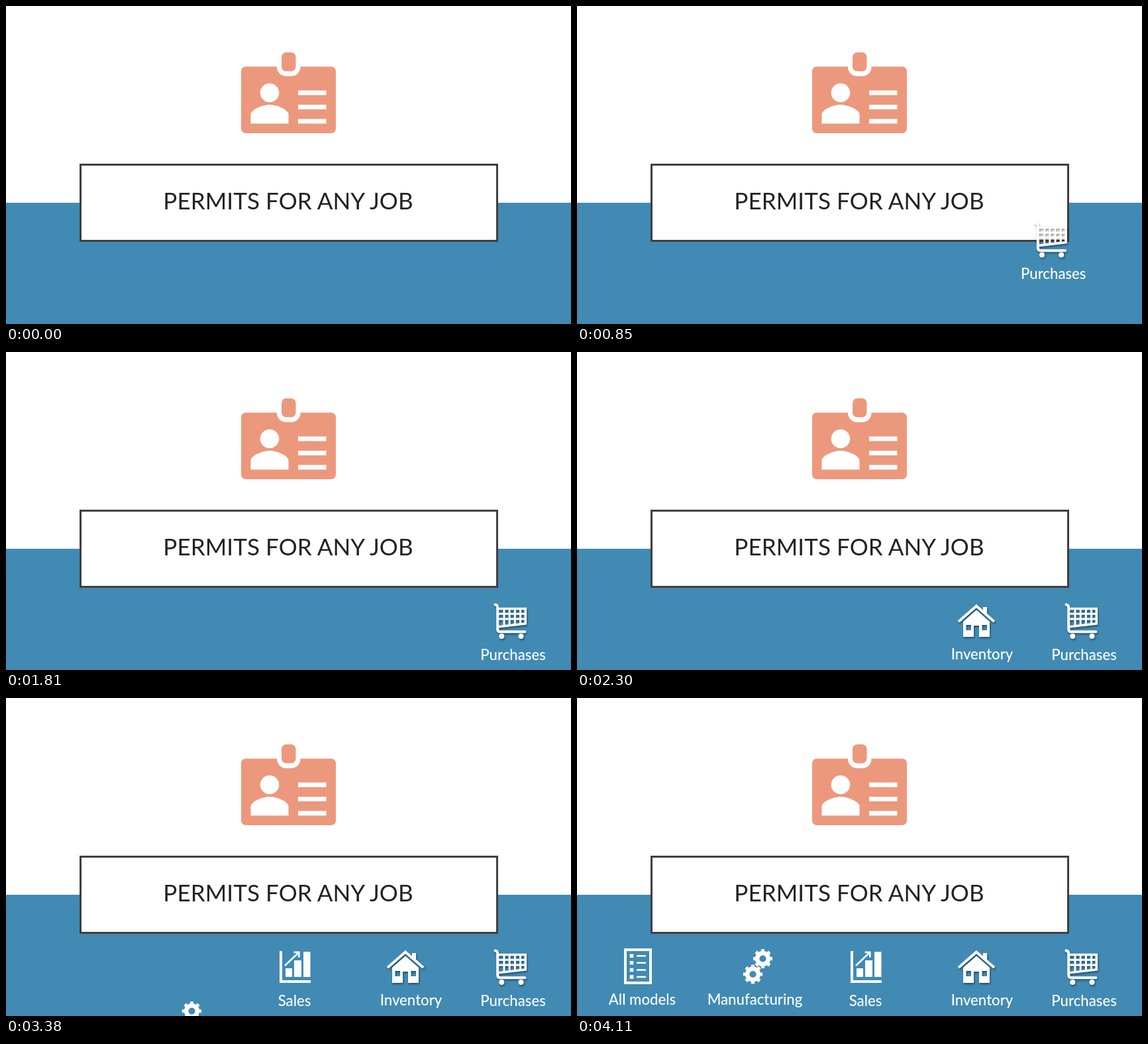
Recreate the animation shown at these times as an HTML page. Size 853 by 480 pixels, loop 4.17 s.

```html
<!DOCTYPE html>
<html lang="en">
<head>
<meta charset="utf-8">
<title>Permits</title>
<style>
html, body { margin: 0; width: 100%; height: 100%; overflow: hidden; background: #fff; }
svg { display: block; width: 853px; height: 480px; }
text { font-family: Lato, "Open Sans", sans-serif; text-anchor: middle; }
.item { fill: #fff; font-size: 22.2px; font-weight: 500; }
.line { fill: none; stroke: #fff; }
.shadow { filter: drop-shadow(1px 2px 1.5px rgba(0, 0, 0, .45)); }
</style>
</head>
<body>
<svg viewBox="0 0 853 480">
  <defs>
    <clipPath id="wipe"><rect id="wipeBox" x="690" y="370" width="163" height="120"/></clipPath>
    <g id="gear" class="line">
      <circle r="8.4" stroke-width="6.6"/>
      <circle r="12.5" stroke-width="4.2" pathLength="16" stroke-dasharray="1 1" stroke-dashoffset=".5"/>
    </g>
  </defs>

  <rect y="297" width="853" height="183" fill="#418ab3"/>

  <g fill="#ec987d">
    <rect x="355" y="91.5" width="143" height="100.5" rx="7"/>
    <rect x="409" y="76" width="35.5" height="30" rx="14" fill="#fff"/>
    <rect x="416" y="70" width="21.5" height="28.5" rx="7"/>
    <g fill="#fff">
      <circle cx="398" cy="131" r="14.3"/>
      <path d="M369.5 177.500V163.500C370 156 388 149 398 149S426 156 426.500 163.500V177.500Z"/>
      <path d="M441 127.500h42.500v7h-42.500zM441 149h42.500v7h-42.500zM441 170.500h42.500v7h-42.500z"/>
    </g>
  </g>

  <rect x="112.500" y="239.500" width="629" height="115" fill="#fff" stroke="#3f3f3f" stroke-width="3"/>
  <text x="426" y="307" font-size="35" letter-spacing=".1" fill="#222">PERMITS FOR ANY JOB</text>

  <g id="models" class="item">
    <rect class="line" x="73" y="380" width="38" height="50" stroke-width="4"/>
    <path class="line" stroke-width="5.5" stroke-dasharray="5.5 5.1" d="M82.500 386.500V424"/>
    <path class="line" stroke-width="2.500" d="M90 389.200h14M90 399.800h14M90 410.400h14M90 421h14"/>
    <text x="98.500" y="463">All models</text>
  </g>

  <g id="making" class="item">
    <use href="#gear" x="280.500" y="393.500"/>
    <use href="#gear" x="265.500" y="417"/>
    <text x="268.500" y="463">Manufacturing</text>
  </g>

  <g id="sales" class="item">
    <path d="M413 382h4v44h43v4h-47zM422 408h10v13h-10zM435 396h11v25h-11zM449 383h10.500v38h-10.500z"/>
    <path class="line" stroke-width="2.500" d="M421 404L441.500 384.500M434.500 383.700h7.800v7.800"/>
    <text x="435.500" y="465">Sales</text>
  </g>

  <g id="stock" class="item">
    <g class="shadow">
      <path class="line" stroke-width="4" d="M576 407L603 383.500 630 407"/>
      <path d="M613 385h6v12l-6 -5z"/>
      <path fill-rule="evenodd" d="M583 407L603 389.500 623 407V430H583ZM587.500 412v8h7.500v-8zM611.500 412v8h7.500v-8zM599 413v17h8v-17z"/>
    </g>
    <text x="611.500" y="464">Inventory</text>
  </g>

  <g id="buying" class="item"><g clip-path="url(#wipe)">
    <g class="shadow">
      <path class="line" stroke-width="4" stroke-linecap="round" d="M738.500 381.200q3.700 .6 3.700 4.600V418.500q0 3.800 3.800 3.800H783.500"/>
      <path class="line" stroke-width="3.600" d="M743 387.500H784.300V410L743 414.800"/>
      <path class="line" stroke-width="3" d="M743 395.300h41M743 403h41M752 387v26M760.200 387v25M768.400 387v24M776.600 387v24"/>
      <circle cx="748.300" cy="429" r="4"/>
      <circle cx="777.500" cy="429" r="4"/>
    </g>
    <text x="765.500" y="465">Purchases</text>
  </g></g>
</svg>

<script>
const LOOP = 4170, W = 853, H = 480, MID = 429;
const el = id => document.getElementById(id);
const part = (t, start, length) => Math.min(1, Math.max(0, (t - start) / length));

// Interpolates through [input, output] pairs.
function curve(points, x) {
  const i = Math.max(1, points.findIndex(p => p[0] >= x));
  const [x0, y0] = points[i - 1], [x1, y1] = points[i];
  return y0 + (y1 - y0) * (x - x0) / (x1 - x0);
}

const GLIDE = [[0, 0], [.14, .36], [.43, .73], [.71, .91], [1, 1]];
const FALL = [[0, 0], [.25, .07], [.5, .2], [.75, .467], [1, 1]];
const HOP = [[0, 0], [.125, .2665], [.25, .4], [.375, .465], [.5, .5],
  [.625, .535], [.75, .6], [.875, .7335], [1, 1]];
const HOPS = [[664, 664, 9], [1324, 332, 27], [1656, 164, 81]];
const SQUASHES = [[650, .4], [1312, .2], [1642, .1], [1808, .05]];

// Playback runs at 15 steps a second, with one doubled step in every thirty.
function clock(t) {
  const rest = t % 1810;
  const step = rest < 130 ? 0 : 2 + Math.floor((rest - 130) / 60);
  return (30 * Math.floor(t / 1810) + step) * 1000 / 15;
}

function turn(id, x, y, scale, angle = 0) {
  el(id).setAttribute("transform",
    `translate(${x} ${y}) rotate(${angle}) scale(${scale}) translate(${-x} ${-y})`);
}

function fade(id, p) {
  el(id).setAttribute("opacity", p);
}

function bounce(t) {
  const dx = -W / 4 * (1 - curve(GLIDE, part(t, 0, 1822)));
  let lift = 0, squash = 0;
  if (t < 664) lift = Math.sin(Math.PI * (.5 + curve(FALL, t / 664) / 2)) / 3;
  for (const [start, length, size] of HOPS)
    if (t >= start) lift = Math.sin(Math.PI * curve(HOP, part(t, start, length))) / size;
  for (const [start, amount] of SQUASHES)
    if (t >= start) squash = amount * part(t, start, 26) * (1 - part(t, start + 26, 166)) ** 2;
  el("buying").setAttribute("transform",
    `translate(${dx} ${MID - H * lift}) scale(1 ${1 - squash}) translate(0 ${-MID})`);
  el("wipeBox").setAttribute("y", 490 - 120 * part(t, 0, 580));
}

function draw(now) {
  const t = clock(now % LOOP);
  bounce(t);

  const zoom = part(t, 2017, 500);
  turn("stock", 611.5, MID, zoom);
  fade("stock", zoom);

  const grow = part(t, 2533, 1000);
  turn("sales", 438, MID, grow, 90 * (1 - grow));
  fade("sales", grow);

  el("making").setAttribute("transform", `translate(0 ${118.5 * (1 - part(t, 3567, 500))})`);
  fade("models", part(t, 4080, 450));
}

let begin;
function tick(now) {
  begin ??= now;
  draw(Math.max(0, now - begin));
  requestAnimationFrame(tick);
}
draw(0);
requestAnimationFrame(tick);
</script>
</body>
</html>
```
